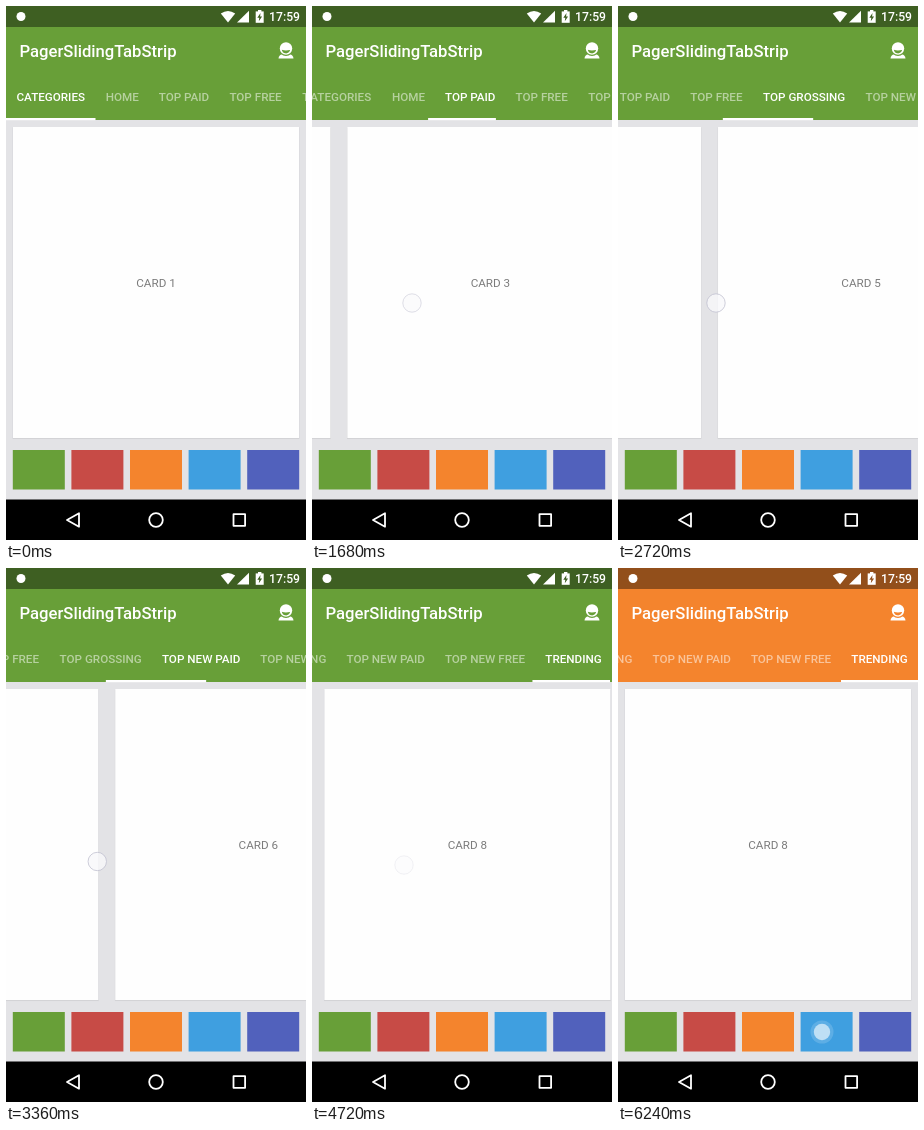
Write an HTML page with a canvas that moves like this. It is 300x534 px and loops after 6.4 s.

```html
<!DOCTYPE html>
<html lang="en">
<head>
<meta charset="utf-8">
<title>Sliding tabs</title>
<style>
html, body { margin: 0; width: 100%; height: 100%; overflow: hidden; background: #000; }
canvas { display: block; width: 300px; height: 534px; }
</style>
</head>
<body>
<canvas id="stage"></canvas>
<script>
const W = 300, H = 534, LOOP = 6400, STEP = 80;
const canvas = document.getElementById('stage');
const ctx = canvas.getContext('2d');
const dpr = window.devicePixelRatio || 1;
canvas.width = W * dpr;
canvas.height = H * dpr;

const GREEN = [104, 159, 56], RED = [199, 75, 70], ORANGE = [244, 132, 45];
const BLUE = [63, 159, 224], INDIGO = [81, 97, 188];
const SWATCHES = [GREEN, RED, ORANGE, BLUE, INDIGO];

const TABS = ['CATEGORIES', 'HOME', 'TOP PAID', 'TOP FREE', 'TOP GROSSING',
  'TOP NEW PAID', 'TOP NEW FREE', 'TRENDING'];
const EDGES = [0, 89.5, 143, 213, 286, 388.5, 487, 587, 664];
const MAX_SCROLL = 364, PITCH = 303;

// One swipe per page: start time, finger start x, release x, y, fade end
const SWIPES = [
  [741, 296, 95, 297, 370],
  [1340, 298, 100, 297, 440],
  [1920, 302, 113, 299, 450],
  [2460, 298, 98, 297, 440],
  [3109, 292, 91, 293.5, 450],
  [3771, 294, 88, 297.5, 450],
  [4320, 295, 92, 297, 440]
];
const SWIPE_MS = 480, FADE_MS = 150;

// Taps on the swatches: x, y, down, up, gone
const TAPS = [
  [100, 471, 5200, 5370, 5530],
  [151, 467, 5680, 5820, 5980],
  [204, 464, 6080, 6400, 6560]
];
const THEMES = [[0, GREEN], [5370, RED], [5820, ORANGE]];
const THEME_MS = 240;

const clamp = (v, a = 0, b = 1) => Math.min(b, Math.max(a, v));
const mix = (a, b, k) => a + (b - a) * k;
const rgb = c => `rgb(${c.map(Math.round).join(',')})`;
const white = a => `rgba(255,255,255,${a})`;
const shade = c => c.map(v => v * 0.6);

function rect(x, y, w, h, fill) {
  ctx.fillStyle = fill;
  ctx.fillRect(x, y, w, h);
}

function poly(points, fill) {
  ctx.beginPath();
  points.forEach(([x, y]) => ctx.lineTo(x, y));
  ctx.closePath();
  if (fill) { ctx.fillStyle = fill; ctx.fill(); } else ctx.stroke();
}

function disc(x, y, r, fill) {
  ctx.beginPath();
  ctx.arc(x, y, r, 0, Math.PI * 2);
  if (fill) { ctx.fillStyle = fill; ctx.fill(); } else ctx.stroke();
}

function text(str, x, y, size, weight, fill, align = 'left') {
  ctx.font = `${weight} ${size}px Roboto, sans-serif`;
  ctx.textAlign = align;
  ctx.fillStyle = fill;
  ctx.fillText(str, x, y);
}

function swipeProgress(t, start) {
  const v = clamp((t - start) / SWIPE_MS);
  return 1 - Math.pow(1 - v * v, 3.4);
}

function themeAt(t) {
  let i = 0;
  while (i + 1 < THEMES.length && t >= THEMES[i + 1][0]) i++;
  const now = THEMES[i][1], before = THEMES[Math.max(0, i - 1)][1];
  const k = i ? clamp((t - THEMES[i][0]) / THEME_MS) : 1;
  return { tabs: now, bar: now.map((v, j) => mix(before[j], v, k)) };
}

function drawStatus(color) {
  rect(0, 0, W, 21, rgb(shade(color)));
  disc(15, 10.5, 4.5, '#fff');
  ctx.beginPath();
  ctx.moveTo(222, 16.5);
  ctx.lineTo(214.8, 7.6);
  ctx.quadraticCurveTo(222, 2.6, 229.2, 7.6);
  ctx.closePath();
  ctx.fillStyle = '#fff';
  ctx.fill();
  poly([[231, 16.5], [243, 16.5], [243, 4.8]], '#fff');
  rect(249.7, 5.4, 8, 11.4, '#fff');
  rect(252, 4, 3.4, 2, '#fff');
  poly([[254.5, 7], [251.3, 11.7], [253.3, 11.7], [252.8, 15.2], [256.1, 10.4], [254.1, 10.4]],
    rgb(shade(color)));
  text('17:59', 294, 15.3, 12.2, 500, '#fff', 'right');
}

function drawToolbar(color) {
  const fill = rgb(color);
  rect(0, 21, W, 46.5, fill);
  text('PagerSlidingTabStrip', 13.5, 50.8, 16.67, 500, '#fff');
  ctx.beginPath();
  ctx.moveTo(272.5, 52.4);
  ctx.quadraticCurveTo(272.8, 48.6, 277, 48);
  ctx.lineTo(283, 48);
  ctx.quadraticCurveTo(287.2, 48.6, 287.5, 52.4);
  ctx.closePath();
  ctx.fillStyle = '#fff';
  ctx.fill();
  disc(280, 43, 7, fill);
  disc(280, 42.5, 6.2, '#fff');
  ctx.beginPath();
  ctx.arc(280, 43.2, 4.2, 0.15, Math.PI - 0.15);
  ctx.quadraticCurveTo(280, 45.4, 284.2, 43.8);
  ctx.fillStyle = fill;
  ctx.fill();
}

function drawTabs(color, page) {
  const i = Math.min(Math.floor(page), TABS.length - 1);
  const k = Math.pow(page - i, 1.45);
  const left = mix(EDGES[i], EDGES[i + 1], k);
  const right = mix(EDGES[i + 1], EDGES[Math.min(i + 2, TABS.length)], k);
  const scroll = clamp((left + right) / 2 - W / 2, 0, MAX_SCROLL);
  const active = Math.round(page);
  rect(0, 67, W, 47, rgb(color));
  TABS.forEach((name, n) => {
    const mid = (EDGES[n] + EDGES[n + 1]) / 2 - scroll;
    text(name, mid, 95.4, 11.67, 500, n === active ? '#fff' : white(0.52), 'center');
  });
  rect(left - scroll, 112, right - left, 2.2, '#fff');
}

function drawCards(page) {
  rect(0, 114, W, 380, '#e3e3e6');
  for (let n = 0; n < TABS.length; n++) {
    const x = 7 + (n - page) * PITCH;
    if (x > W || x < -290) continue;
    rect(x - 0.4, 121.5, 286.8, 311.6, '#d3d3d6');
    rect(x, 121, 286, 311, '#fefefe');
    text('CARD ' + (n + 1), x + 143, 281, 11.67, 400, '#7b7b7b', 'center');
  }
}

function drawSwatches() {
  SWATCHES.forEach((c, i) => rect(6.8 + i * 58.6, 444, 52, 39.5, rgb(c)));
}

function drawNav() {
  rect(0, 493.5, W, 41, '#000');
  ctx.strokeStyle = '#fff';
  ctx.lineWidth = 1.8;
  ctx.lineJoin = 'round';
  poly([[61, 514], [73, 507.3], [73, 520.7]]);
  disc(150, 514, 6.8);
  ctx.strokeRect(227.5, 508.2, 11.6, 11.6);
}

function drawFinger(t) {
  for (const [start, from, to, y, gone] of SWIPES) {
    const age = t - start;
    if (age < 0 || age >= gone) continue;
    const x = Math.max(to, from - PITCH * swipeProgress(t, start));
    ctx.globalAlpha = clamp((gone - age) / FADE_MS) * clamp(0.4 + age / 120);
    disc(x, y, 9.2, 'rgba(247,247,250,0.8)');
    ctx.strokeStyle = 'rgba(190,190,206,0.75)';
    ctx.lineWidth = 1;
    disc(x, y, 9.2);
  }
  for (const [x, y, down, up, gone] of TAPS) {
    if (t < down || t >= gone) continue;
    ctx.globalAlpha = t < up ? clamp(0.4 + (t - down) / 200) : clamp((gone - t) / (gone - up));
    disc(x, y, 11.5, white(0.16));
    disc(x, y, 8.2, white(0.6));
  }
  ctx.globalAlpha = 1;
}

function draw(t) {
  const page = SWIPES.reduce((sum, s) => sum + swipeProgress(t, s[0]), 0);
  const theme = themeAt(t);
  ctx.setTransform(dpr, 0, 0, dpr, 0, 0);
  drawCards(page);
  drawStatus(theme.tabs);
  drawToolbar(theme.bar);
  drawTabs(theme.tabs, page);
  drawSwatches();
  drawNav();
  drawFinger(t);
}

const origin = performance.now();
function tick() {
  const t = (performance.now() - origin) % LOOP;
  draw(Math.min(Math.floor(t / STEP) * STEP, LOOP - 2 * STEP));
  requestAnimationFrame(tick);
}
tick();
</script>
</body>
</html>
```
